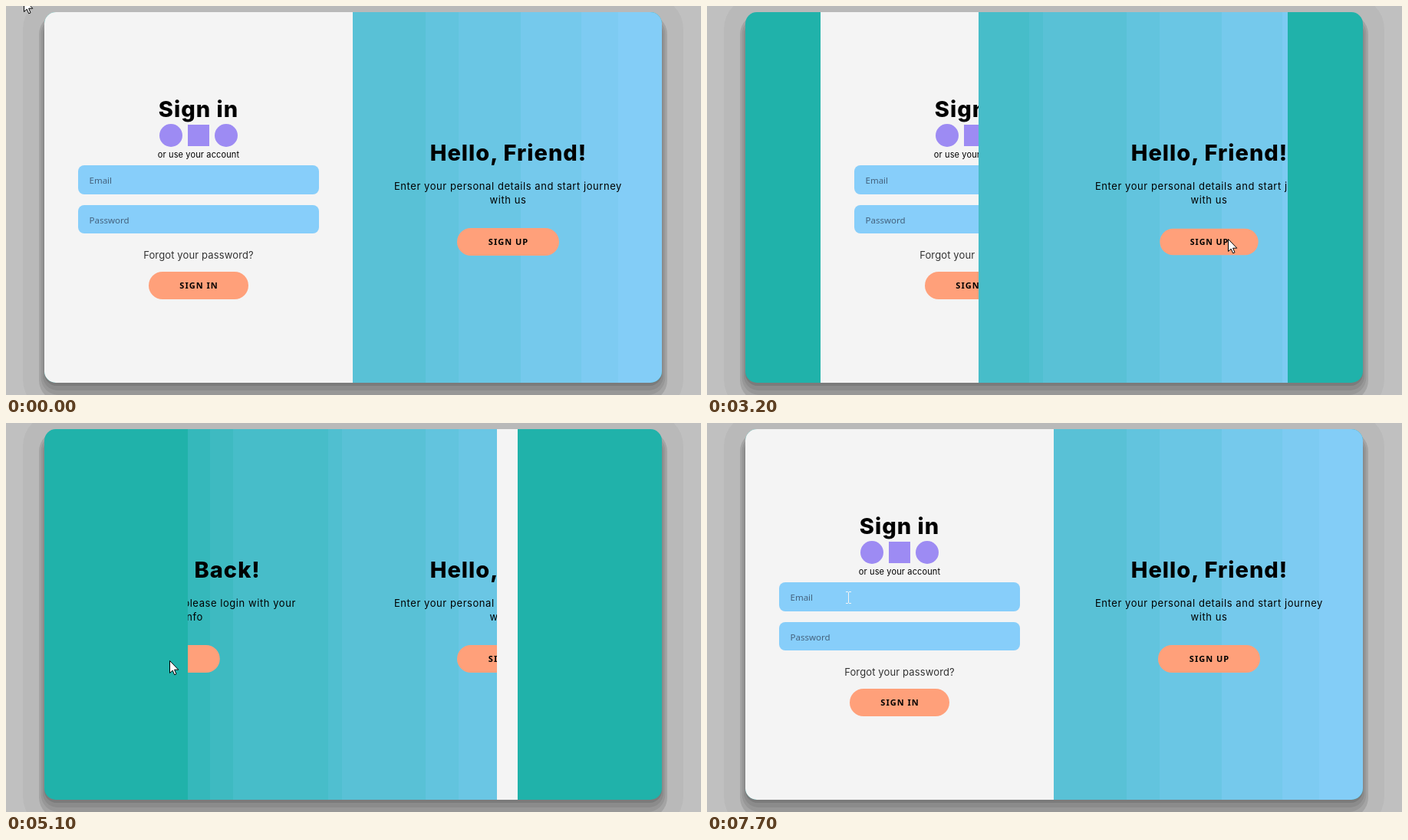
Animation, 906 px wide and 508 px high, one loop 8000 ms. Source, as an HTML page:

```html
<!DOCTYPE html>
<html lang="en">
<head>
<meta charset="utf-8">
<title>Sliding sign-in form</title>
<style>
  html, body { margin: 0; width: 100%; height: 100%; overflow: hidden; background: #c0c0c0; }
  svg { display: block; width: 100vw; height: 100vh; }
  text { text-anchor: middle; font-family: Inter, sans-serif; }
  .title { font-size: 29px; font-weight: 800; letter-spacing: 1px; }
  .lead { font-size: 13px; letter-spacing: .56px; }
  .link { font-size: 13px; letter-spacing: .13px; fill: #333; }
  .hint { font-size: 11px; letter-spacing: .13px; }
  .label { font: 700 11px "Noto Sans", sans-serif; letter-spacing: 1px; }
  .entry { font: 11.5px "Noto Sans", sans-serif; text-anchor: start; fill: #45627d; }
  .entry.typed { fill: #111; }
</style>
</head>
<body>
<svg id="stage" viewBox="0 0 906 508"></svg>
<script>
const LOOP = 8000, STEP = 100, SLIDE = 600;

const text = (cls, x, y, str) => `<text class="${cls}" x="${x}" y="${y}">${str}</text>`;
const rect = (x, y, w, h, fill, r = 0, id = '') =>
  `<rect id="${id}" x="${x}" y="${y}" width="${w}" height="${h}" rx="${r}" fill="${fill}"/>`;

const button = (str, cx, cy, w, id = '') =>
  `<g transform="translate(${cx} ${cy})"><g id="${id}">` +
  rect(-w / 2, -18, w, 36, '#ffa07a', 18) + text('label', .5, 4, str) + '</g></g>';

function field(str, y, id = '') {
  const top = Math.round(y), bottom = Math.round(y + 37.4);
  return rect(94, top, 314, bottom - top, '#87cefa', 8) +
    `<text class="entry" id="${id}" x="108.5" y="${y + 23.5}">${str}</text>`;
}

const icons = cy =>
  `<g fill="#9d8bf3"><circle cx="215" cy="${cy}" r="15"/>` +
  `<rect x="237" y="${cy - 14}" width="28" height="28"/><circle cx="287" cy="${cy}" r="15"/></g>`;

const paper = rect(50, 8, 402, 484, '#f4f4f4');

function shadow() {
  // left edge, top, bottom, corner radius, colour
  return [[22, -12, 530, 42, '#b9b9b9'], [43, 10, 516, 27, '#a4a4a4'], [45.5, 14, 508, 23, '#979797'],
          [48, 18, 502, 19, '#8b8b8b'], [50, 22, 496, 16, '#7b7b7b']]
    .map(([x, top, bottom, r, fill]) => rect(x, top, 905 - 2 * x, bottom - top, fill, r)).join('');
}

// stepped gradient from light sea green to light sky blue
function bands() {
  const edges = [50, 104, 170, 266, 296, 420, 438, 547, 590, 671, 750, 798, 855];
  const from = [32, 178, 170], to = [135, 206, 250];
  return edges.slice(1).map((end, i) => {
    const start = edges[i], k = ((start + end) / 2 - 50) / 805;
    const rgb = from.map((c, n) => Math.round(c + (to[n] - c) * k));
    return rect(start, 8, end - start, 484, `rgb(${rgb})`);
  }).join('');
}

const signIn = paper + text('title', 251, 145, 'Sign in') + icons(169) +
  text('hint', 251, 198, 'or use your account') +
  field('Email', 208.3, 'email') + rect(0, 220, 1, 14, '#111', 0, 'caret') +
  field('Password', 260) +
  text('link', 251, 330, 'Forgot your password?') + button('SIGN IN', 251, 365, 130);

const signUp = paper + text('title', 251.5, 36, 'Create Account') + icons(60) +
  text('hint', 251.5, 89, 'or use your email for registration') +
  ['Username', 'Email', 'Password', 'Address', 'City', 'Postal code', 'Phone No']
    .map((name, i) => field(name, 99.2 + 51.85 * i)).join('') +
  button('SIGN UP', 251.5, 473, 133);

const welcome = text('title', 251.5, 202, 'Welcome Back!') +
  text('lead', 250, 240, 'To keep connected with us please login with your') +
  text('lead', 250.5, 258, 'personal info') + button('SIGN IN', 250.5, 308, 131, 'toSignIn');

const hello = text('title', 655, 202, 'Hello, Friend!') +
  text('lead', 654.5, 240, 'Enter your personal details and start journey') +
  text('lead', 654.5, 258, 'with us') + button('SIGN UP', 654.5, 308, 133, 'toSignUp');

const stage = document.getElementById('stage');
stage.innerHTML =
  `<defs><clipPath id="card">${rect(50, 8, 805, 484, '#000', 15)}</clipPath>` +
  `<clipPath id="window">${rect(452, 8, 403, 484, '#000', 0, 'pane')}</clipPath></defs>` +
  shadow() +
  `<g clip-path="url(#card)">${rect(50, 8, 805, 484, '#20b2aa')}` +
  `<g id="signIn">${signIn}</g><g id="signUp">${signUp}</g>` +
  `<g clip-path="url(#window)">${bands()}<g id="welcome">${welcome}</g>${hello}</g></g>` +
  `<path id="arrow" d="M.5 .5V16.5L4.2 13.2 6.7 18.8 9 17.8 6.6 12.2H11.8Z" fill="#fff" stroke="#000"/>` +
  `<path id="beam" d="M-3 -7.5H0M1 -7.5H4M.5 -7V7M-3 7.5H0M1 7.5H4" fill="none" stroke="#f4f4f4"/>`;

const el = Object.fromEntries([...stage.querySelectorAll('[id]')].map(e => [e.id, e]));
const show = (e, on) => e.setAttribute('visibility', on ? 'visible' : 'hidden');
const move = (e, x, y = 0) => e.setAttribute('transform', `translate(${x} ${y})`);

// cubic-bezier(.42, 0, .58, 1)
function easeInOut(u) {
  if (u <= 0) return 0;
  if (u >= 1) return 1;
  let lo = 0, hi = 1, s;
  for (let i = 0; i < 24; i++) {
    s = (lo + hi) / 2;
    const x = 1.26 * s * (1 - s) ** 2 + 1.74 * s * s * (1 - s) + s ** 3;
    if (x < u) lo = s; else hi = s;
  }
  return s * s * (3 - 2 * s);
}

// start time, then one point per step; the pointer rests after the last
const moves = [
  [0, [23, -9]],
  [600, [85, 55], [150, 110], [201, 150]],
  [1300, [534, 80], [645, 150], [730, 239]],
  [1900, [836, 190], [760, 60], [560, 9], [340, 60], [232, 170], [400, 260], [600, 306], [679, 304]],
  [3800, [600, 322], [470, 318], [340, 313], [250, 310], [213, 310]],
  [5500, [206, 285], [197, 246], [191, 238], [186, 231], [184, 228]]
];
function pointer(t) {
  const [start, ...points] = moves.findLast(m => m[0] <= t);
  return points[Math.min(points.length - 1, Math.floor((t - start) / STEP))];
}

const typing = [[0, ''], [6800, 's'], [7000, 'ss'], [7500, 's'], [7700, '']];

function draw(t) {
  // slide to sign-up, then back, on whole pixels
  const uOut = t < 3200 ? 0 : (t - 2995) / SLIDE, q = easeInOut((t - 4812) / SLIDE);
  const p = easeInOut(uOut) - q, shift = Math.round(403 * p);
  move(el.signIn, shift);
  move(el.signUp, shift);
  move(el.welcome, -80 * (1 - p));
  el.pane.setAttribute('x', Math.round(452 - 402 * p));
  show(el.signUp, uOut >= .5 && q < .625);
  el.signUp.setAttribute('opacity', 1 - q);

  el.toSignUp.setAttribute('transform', `scale(${t === 3200 ? .965 : 1})`);
  el.toSignIn.setAttribute('transform', `scale(${t === 4800 || t === 4900 ? .95 : 1})`);

  const [x, y] = pointer(t), overField = t >= 5700;
  show(el.arrow, !overField);
  show(el.beam, overField);
  move(overField ? el.beam : el.arrow, x, y);

  const typed = typing.findLast(k => k[0] <= t)[1];
  el.email.textContent = typed || 'Email';
  el.email.classList.toggle('typed', !!typed);
  const caretOn = typed && (t < 7200 || t >= 7500);
  show(el.caret, caretOn);
  if (caretOn) el.caret.setAttribute('x', Math.floor(108.8 + el.email.getComputedTextLength()));
}

function tick() {
  draw(Math.floor(performance.now() % LOOP / STEP) * STEP);
  requestAnimationFrame(tick);
}
tick();
</script>
</body>
</html>
```
